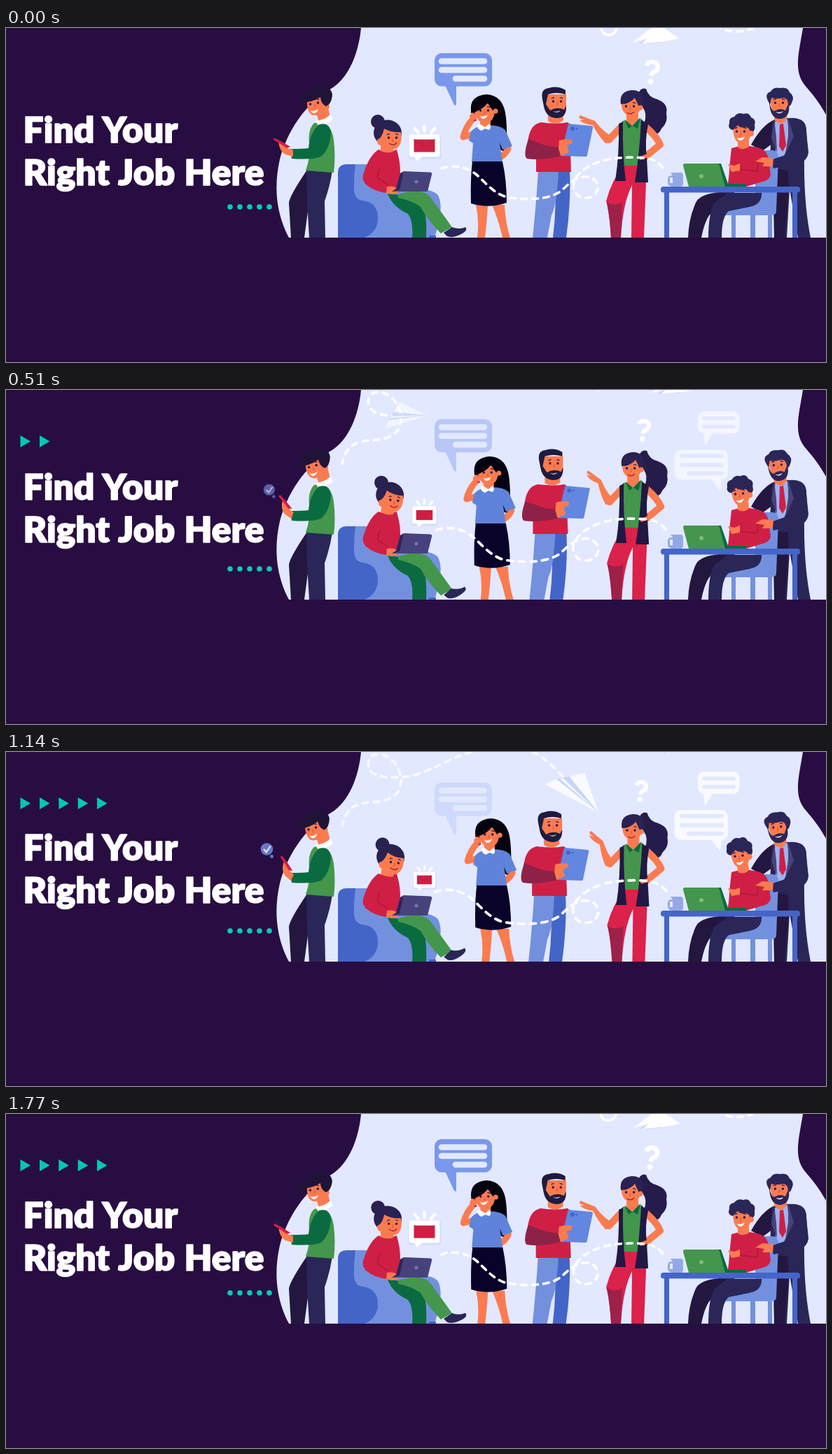
Recreate the animation shown at these times as an HTML page. Size 1171 px wide and 478 px high, loop 1800 ms.

```html
<!DOCTYPE html>
<html lang="en">
<head>
<meta charset="utf-8">
<title>Find Your Right Job Here</title>
<style>
  html, body { margin: 0; width: 100%; height: 100%; overflow: hidden; background: #280d42; }
  svg { display: block; width: 1171px; height: 478px; }
  .title { font: 900 51.5px Lato, Inter, sans-serif; word-spacing: 1.5px; fill: #fff; stroke: #fff; stroke-width: 1.6; stroke-linejoin: round; }
  .skin { fill: #fa7b50; }
  .limb { fill: none; stroke: #fa7b50; stroke-linecap: round; stroke-linejoin: round; }
  .red { fill: #d01f45; } .wine { fill: #8e2148; }
  .green { fill: #43964b; } .pine { fill: #0a6b40; }
  .navy { fill: #2b2658; } .dark { fill: #231740; }
  .blue { fill: #4465c8; } .mid { fill: #7390df; }
  .white { fill: #fff; } .sky { fill: #e2e8ff; } .teal { fill: #00c9b0; }
  .dash { fill: none; stroke: #fff; stroke-width: 3.6; stroke-linecap: round; stroke-dasharray: 8 8; }
</style>
</head>
<body>
<svg viewBox="0 0 1171 478">
  <defs>
    <clipPath id="stage"><rect width="1171" height="300"/></clipPath>
    <clipPath id="wipe"><rect id="wipeBox" x="18" y="60" height="28"/></clipPath>
    <mask id="reveal" maskUnits="userSpaceOnUse" x="460" y="-30" width="360" height="150">
      <path id="revealPath" fill="none" stroke="#fff" stroke-width="8"/>
    </mask>
    <g id="face">
      <circle cx="-5.5" r="1.7" fill="#2a1440"/><circle cx="5.5" r="1.7" fill="#2a1440"/>
      <path d="M-8-4q2-2 4-1M4-5q2-1 4 1" fill="none" stroke="#2a1440" stroke-width="1.2"/>
      <path d="M0 1q2 4-1 4" fill="none" stroke="#e2552f" stroke-width="1.2"/>
    </g>
    <path id="smile" class="white" d="M-5 0Q1 2 6-2Q4 4-1 4Q-4 3-5 0z"/>
  </defs>
  <rect width="1171" height="478" fill="#280d42"/>

  <g clip-path="url(#stage)">
    <path class="sky" d="M507 0C504 34 490 72 464 87C425 110 401 150 391 188C382 228 386 266 404 300H1171V124C1160 104 1150 93 1140 81C1124 60 1133 33 1138 0z"/>

    <!-- flying things -->
    <g id="trail"><g mask="url(#reveal)"><path id="route" class="dash" d="M480 107C484 80 500 73 521 72S563 66 564 42C564 20 548 3 531 3C516 3 513 22 524 30C535 37 548 37 562 36C600 36 640 2 672-1C705-8 745-6 760 4C778 16 787 27 798 38"/></g></g>
    <g id="plane">
      <path class="white" d="M11-20L53 0L2-5zM-11 20L53 0L-6 7z"/>
      <path d="M2-5L53 0L-6 7z" fill="#c3d0fa"/>
      <path class="white" d="M-1 1L53 0L-4 4z"/>
    </g>
    <g id="topPlane">
      <path class="white" d="M921-12L962 15L927 12zM894 21L924-2L934 10z"/>
      <path d="M903 22L930 8L936 21z" fill="#c3d0fa"/>
      <path class="white" d="M927 5L962 15L935 20L908 22z"/>
    </g>
    <circle id="ring" cx="861" cy="-1" r="11" fill="none" stroke="#fff" stroke-width="3.6"/>
    <path id="topDash" class="dash" d="M1014-4Q1040 14 1074-3"/>
    <g id="ask">
      <path d="M-8-8Q-7-14 0-14Q8-14 8-7Q8-2 3 0Q0 2 0 6" fill="none" stroke="#fff" stroke-width="6.5"/>
      <circle class="white" cy="14" r="4.2"/>
    </g>
    <g id="chat">
      <rect x="612" y="36" width="82" height="47.5" rx="10" fill="#7a98eb"/>
      <path d="M627 82L640 110Q643 112 643 109V82z" fill="#7a98eb"/>
      <path d="M622 47.5H683M622 60H683M642 72.5H683" stroke="#e2e8ff" stroke-width="8.5" stroke-linecap="round"/>
    </g>
    <g id="noteA">
      <rect class="white" x="988" y="24" width="59.5" height="32" rx="9"/>
      <path class="white" d="M996 54L998 74L1010 54z"/>
      <path d="M997 34H1039M997 46H1039" stroke="#e2e8ff" stroke-width="5.5" stroke-linecap="round"/>
    </g>
    <g id="noteB">
      <rect class="white" x="954.5" y="79.5" width="76.5" height="42.5" rx="9"/>
      <path class="white" d="M1006 120L1020 138L1022 120z"/>
      <path d="M965 88H1022M965 101H1022M975 113H1022" stroke="#e2e8ff" stroke-width="6" stroke-linecap="round"/>
    </g>

    <!-- man with phone -->
    <path class="dark" d="M430 203Q405 240 404 250L407 300H426L432 255L448 207z"/>
    <path class="navy" d="M429 204H466Q463 225 455 248L456 300H433L430 250z"/>
    <path class="green" d="M440 136Q464 131 468 160Q471 185 468 207L428 204Q435 185 433 165Q431 145 440 136z"/>
    <path class="skin" d="M442 118L460 114L463 128L447 135z"/>
    <path class="white" d="M442 133Q455 132 463 124L467 131Q458 138 446 140z"/>
    <path class="pine" d="M447 138Q462 134 464 150Q463 172 450 184Q438 189 408 187L406 173Q425 173 432 172Q434 150 447 138z"/>
    <g id="phoneHand">
      <path class="skin" d="M410 174Q400 174 393 162L389 162Q390 176 399 181L410 184z"/>
      <path class="red" d="M382 160Q382 157 385 158L396 164L406 170L401 172L392 166z"/>
    </g>
    <g id="head1">
      <circle class="skin" cx="457" cy="112" r="5"/>
      <path class="skin" d="M430 101Q430 90 446 92Q458 98 456 115Q449 126 439 125Q429 123 430 101z"/>
      <path d="M419 107Q419 96 431 92Q436 82 450 82Q466 85 466 97Q464 110 457 112Q450 109 449 99Q436 107 419 107z" fill="#201338"/>
      <use href="#face" transform="translate(440 108) rotate(-10)"/>
      <use href="#smile" x="440" y="118"/>
    </g>
    <g id="check">
      <circle r="10" fill="#6f89dc"/><circle cx="8" cy="12" r="2.8" fill="#6f89dc"/>
      <path d="M-5 0L-1 5L6-5" fill="none" stroke="#fff" stroke-width="2.6"/>
    </g>

    <!-- woman on armchair -->
    <path class="mid" d="M490 195H515Q540 200 544 235Q602 225 616 238Q627 255 612 300H480z"/>
    <path class="blue" d="M474 207Q474 195 487 195H499Q497 210 497 232Q498 246 510 247Q531 250 531 272Q531 292 512 300H474zM604 297H614V300H604z"/>
    <path class="pine" d="M545 237Q590 240 598 262Q601 275 600 300H580Q582 276 574 266Q552 256 545 237z"/>
    <path class="green" d="M560 238Q595 228 606 242Q622 264 637 285L621 294Q602 275 592 256Q580 247 560 243z"/>
    <path id="shoe" class="navy" d="M625 293L637 285Q648 289 656 285Q661 290 648 296Q637 301 630 298z"/>
    <path class="red" d="M532 174Q545 179 558 174L560 182Q566 205 560 236H544Q526 234 514 224Q507 216 511 207Q519 182 532 174z"/>
    <path d="M534 200Q530 210 531 215L546 225" fill="none" stroke="#a81a3c" stroke-width="1.5"/>
    <path class="skin" d="M544 227Q556 225 562 233Q556 241 543 236z"/>
    <path d="M568 205L606 206.500Q609 207 608 210L602 234H551L560 230z" fill="#47427c"/>
    <path d="M551 234L562 231L568 205L563 208L557 230z" fill="#2b2658"/>
    <circle cx="586" cy="220" r="2.5" fill="#7774a8"/>
    <g id="head2">
      <path class="skin" d="M535 165H553V177Q544 180 535 176z"/>
      <circle cx="531" cy="134" r="10" fill="#292150"/>
      <ellipse cx="545" cy="150" rx="20" ry="18.5" fill="#292150"/>
      <path class="skin" d="M530 160Q537 158 540 144Q550 150 564 149Q567 168 556 173Q542 177 535 168Q530 168 530 160z"/>
      <use href="#face" x="552" y="157"/>
      <path d="M547 165Q554 170 558 164" fill="none" stroke="#a7242f" stroke-width="1.5"/>
    </g>
    <g id="mail">
      <rect x="-23" y="-11" width="47" height="34" rx="4" fill="#d3ddf8"/>
      <path class="white" d="M-19-12H19Q22-12 22-9V17Q22 20 19 20H-3L-11 26L-14 20H-19Q-22 20-22 17V-9Q-22-12-19-12z"/>
      <path class="red" d="M-15-5H15V13H-15z"/>
      <path d="M-15-5L0 6L15-5" fill="none" stroke="#bd173b"/>
      <path d="M-14-21L-9-15M0-24V-17M15-21L10-15" stroke="#fff" stroke-width="4.5" stroke-linecap="round"/>
    </g>

    <!-- woman on the phone -->
    <g id="caller">
      <path d="M664 118Q662 97 686 95Q711 96 714 128Q717 160 712 177Q696 172 690 145z" fill="#05030f"/>
      <path class="skin" d="M671 253H688Q687 275 684 300H673Q676 275 671 253zM694 253H712Q713 278 720 300H709Q704 276 694 253z"/>
      <path class="limb" stroke-width="9" d="M667 130Q656 142 653 156L668 152M717 172Q713 184 694 190"/>
      <path d="M664 148Q672 139 688 139Q706 139 713 146L723 169L709 174L705 164L709 192H665L667 165L661 161z" fill="#5f83da"/>
      <path d="M666 191H709Q715 218 715 250Q690 259 664 251Q663 215 666 191z" fill="#090329"/>
      <path class="skin" d="M677 128H692V141Q684 146 677 140z"/>
      <path class="white" d="M673 139Q675 136 678 138L684 142L690 137Q694 142 690 146L684 144L679 147Q673 145 673 139z"/>
      <path class="skin" d="M668 110Q672 102 684 106L698 114Q699 134 684 137Q669 134 668 110z"/>
      <path d="M664 122Q662 98 686 96Q704 98 704 124Q694 120 688 107Q680 118 664 122z" fill="#05030f"/>
      <circle class="skin" cx="699" cy="119" r="3.5"/>
      <path class="red" d="M666 121L670 122L672 133L668 133z"/>
      <circle class="skin" cx="667" cy="127" r="5"/>
      <use href="#face" x="683" y="118"/><use href="#smile" x="682" y="126"/>
    </g>

    <!-- man with tablet -->
    <g id="reader">
      <path class="blue" d="M783 204H805Q807 250 800 300H781Q787 255 783 204z"/>
      <path class="mid" d="M760 204H789Q787 252 779 268L773 300H752Q757 255 760 204z"/>
      <path class="red" d="M764 135Q785 138 802 135Q813 141 812 165L806 175L807 206H757V170L745 165Q747 138 764 135z"/>
      <path class="wine" d="M746 159Q738 182 744 187Q765 190 795 183L792 171Q772 170 760 164z"/>
      <path d="M803 137L836 140Q839 140 838 143L830 182Q830 184 827 184L792 183z" fill="#6387e0"/>
      <circle cx="809" cy="144" r="3" fill="#4465c8"/><circle cx="815" cy="144" r="1.5" fill="#4465c8"/>
      <path class="skin" d="M790 161Q800 158 809 160L808 165L801 168L804 178L792 183L789 172z"/>
      <path class="skin" d="M774 118H796V132Q785 141 774 133z"/>
      <path class="skin" d="M767 95H800V114Q796 127 786 127Q772 124 767 95z"/>
      <path d="M766 102Q763 87 775 86Q788 82 799 89L799 95Q786 91 774 95L771 109L777 118Q787 112 797 117L800 111Q801 129 786 129Q771 128 768 112z" fill="#1f1b40"/>
      <use href="#face" x="787" y="105"/>
      <path class="white" d="M781 119Q787 121 792 118Q788 123 781 119z"/>
    </g>

    <!-- woman asking -->
    <g id="asker">
      <path d="M902 97Q905 84 914 87Q917 99 930 102Q946 108 943 122Q946 135 936 144Q932 155 920 152Q908 146 913 130Q915 118 906 110z" fill="#251c4c"/>
      <path d="M882 196H915L911 300H893L894 225Q881 250 878 300H864Q862 265 857 248Q864 220 882 196z" fill="#dc214a"/>
      <path class="wine" d="M858 249Q870 256 880 249L878 300H864Q862 270 858 249z" opacity=".8"/>
      <path class="limb" stroke-width="10" d="M914 142Q930 156 934 167L912 185M877 143L861 160"/>
      <g id="askArm">
        <path class="skin" d="M866 155Q854 150 841 133L820 125Q817 127 820 130L826 131L819 132Q826 138 838 139Q845 153 856 165Q864 166 866 155z"/>
      </g>
      <path class="green" d="M880 133L908 130L911 160L904 197H882L879 160z"/>
      <path d="M875 137L881 134Q880 180 885 219H870Q876 180 875 137zM907 131L917 138Q912 160 915 185L917 221H898Q905 178 907 131z" fill="#211844"/>
      <path class="limb" stroke-width="5" d="M915 183L907 186"/>
      <path class="skin" d="M886 120H903V131L894 140L886 133z"/>
      <path class="pine" d="M883 131L894 140L889 144zM906 128L895 140L902 144z"/>
      <ellipse class="skin" cx="893" cy="110" rx="14" ry="16"/>
      <path d="M878 109Q875 91 893 89Q911 88 910 108L906 118Q902 108 898 100Q890 109 878 109z" fill="#292353"/>
      <circle class="skin" cx="906" cy="114" r="3.5"/>
      <use href="#face" x="891" y="112"/>
      <path d="M887 121Q892 125 897 120" fill="none" stroke="#a7242f" stroke-width="1.5"/>
    </g>

    <!-- desk group -->
    <path class="navy" d="M1095 185H1140Q1139 250 1149 300H1131L1119 230L1115 300H1097z"/>
    <path class="dark" d="M1098 131Q1080 138 1064 167L1080 176L1102 160zM1096 185H1116L1118 232L1112 300H1097z"/>
    <path class="navy" d="M1094 133Q1106 128 1118 129Q1143 127 1143 147L1145 181Q1143 190 1134 193L1136 207L1090 200z"/>
    <path fill="#9db3f2" d="M1098 134L1116 130L1119 165L1108 190L1099 180z"/>
    <path class="red" d="M1105 138L1110 137L1114 168L1109 177L1104 169z"/>
    <path fill="#454478" d="M1097 133L1093 156L1101 178L1100 155zM1117 129L1125 155L1113 180L1117 155z"/>
    <g id="head4">
      <path class="skin" d="M1097 118H1115V131L1107 138L1097 132z"/>
      <path class="skin" d="M1091 98H1118V116Q1113 128 1104 128Q1092 124 1091 98z"/>
      <path class="navy" d="M1090 106Q1094 122 1099 118Q1106 114 1113 118L1118 107Q1121 130 1104 130Q1091 129 1090 106z"/>
      <path class="navy" d="M1088 104Q1083 94 1092 91Q1096 84 1106 86Q1116 84 1119 92Q1127 98 1122 107Q1120 113 1117 111Q1117 100 1110 100Q1101 102 1093 100L1091 110z"/>
      <use href="#face" x="1104" y="107"/>
      <path class="white" d="M1099 120Q1105 122 1110 119Q1106 125 1099 120z"/>
    </g>
    <path class="mid" d="M1070 175H1095Q1103 176 1103 185L1100 262Q1100 268 1092 268H1004Q1000 258 1012 248L1070 240zM1036 266h6v34h-6zM1063 266h7v34h-7zM1088 266h6v34h-6z"/>
    <path class="dark" d="M1040 234Q992 234 985 250Q975 272 974 300H993Q998 274 1008 263L1045 252z"/>
    <path class="navy" d="M1030 236H1079Q1080 252 1062 256L1032 262Q1022 270 1022 300H1003Q1003 265 1012 250z"/>
    <path class="red" d="M1036 172Q1052 166 1068 170Q1086 172 1089 187L1092 210Q1090 218 1080 220L1057 227H1030Q1033 212 1033 200z"/>
    <path d="M1074 190L1073 205L1045 202" fill="none" stroke="#a81a3c" stroke-width="1.5"/>
    <path class="skin" d="M1031 195L1040 197L1048 194V204L1036 206z"/>
    <g id="head3">
      <path class="skin" d="M1045 160H1061V170Q1053 176 1045 171z"/>
      <path class="skin" d="M1038 140Q1052 132 1064 142Q1066 160 1054 165Q1038 168 1038 140z"/>
      <path class="navy" d="M1038 146Q1030 144 1033 136Q1032 128 1040 127Q1045 120 1053 123Q1061 120 1064 128Q1072 131 1069 139Q1071 147 1063 152Q1063 143 1057 142Q1049 144 1045 139z"/>
      <circle class="skin" cx="1064" cy="151" r="4"/>
      <use href="#face" x="1049" y="148"/><use href="#smile" x="1049" y="157"/>
    </g>
    <path class="navy" d="M1129 132Q1143 132 1143 150L1146 178Q1145 188 1134 193L1096 201L1092 189L1127 177z"/>
    <path class="skin" d="M1096 186L1080 185L1070 191L1083 193L1080 198L1095 198z"/>
    <path d="M949 207h14q4 0 4 4v12q0 4-4 4h-10q-8 0-8-6v-5q0-5 7-5" fill="#94a9e4"/>
    <path d="M952 214h-4v8h4z" class="sky"/>
    <path class="blue" d="M940 230h7v70h-7zM1123 230h7v70h-7z"/>
    <rect class="blue" x="935" y="227" width="199" height="8.5" rx="4"/>
    <path class="pine" d="M1016 194H1021L1031 223H1055Q1058 224 1057 227H1024z"/>
    <path class="green" d="M969 194H1016Q1018 194 1019 197L1027 227H975L967 197Q967 194 969 194z"/>
    <circle cx="993" cy="212" r="3" fill="#7fbd72"/>

    <path id="swirl" class="dash" d="M622 201C640 194 660 200 672 210C685 221 695 236 715 242C745 247 775 245 790 235C800 228 806 217 824 213C840 211 846 222 845 230C843 240 834 244 826 243C812 242 808 228 812 218C820 203 835 195 855 189C880 184 905 184 922 188Q932 192 938 200"/>
  </g>

  <g id="title" class="title"><text x="24.5" y="163.5">Find Your</text><text x="24.5" y="224.5">Right Job Here</text></g>
  <path class="teal" clip-path="url(#wipe)" d="M20.500 65v17l14.500-8.500zM48 65v17l14.500-8.500zM75.300 65v17l14.500-8.500zM102.700 65v17l14.500-8.500zM130 65v17l14.500-8.500z"/>
  <path d="M320 256H377" stroke="#0ccbb3" stroke-width="7.6" stroke-linecap="round" stroke-dasharray="0 14"/>
</svg>
<script>
  const LOOP = 1800, STEP = 30;
  const $ = id => document.getElementById(id);
  const route = $('route'), reveal = $('revealPath');
  const total = route.getTotalLength();
  reveal.setAttribute('d', route.getAttribute('d'));

  const put = (id, transform) => $(id).setAttribute('transform', transform);
  const move = (id, x, y) => put(id, `translate(${x} ${y})`);
  const turn = (id, deg, x, y) => put(id, `rotate(${deg} ${x} ${y})`);
  const fade = (id, a) => $(id).setAttribute('opacity', a);
  const smooth = p => p * p * (3 - 2 * p);

  function flight(t, p) {
    const u = Math.min(t / 900, 1);
    const s = total * u * (0.62 + 0.38 * u);
    const at = route.getPointAtLength(s);
    const a = route.getPointAtLength(Math.max(0, s - 4));
    const b = route.getPointAtLength(Math.min(total, s + 4));
    const deg = Math.atan2(b.y - a.y, b.x - a.x) * 180 / Math.PI;
    put('plane', `translate(${at.x} ${at.y}) rotate(${deg}) scale(${0.5 + 0.8 * u})`);
    fade('plane', smooth(p));
    fade('trail', t > 900 ? smooth(p) : 1);
    reveal.setAttribute('stroke-dasharray', `${s} ${total + 10}`);
  }

  function draw(t) {
    const p = 1 - Math.abs(t / 900 - 1);
    const e = smooth(p);

    move('title', 0, -11 * p);
    $('wipeBox').setAttribute('width', Math.max(0, 7 + 0.179 * (t - 240)));
    flight(t, p);

    move('topPlane', 48 * p, -29 * p);
    move('ring', -29 * p, -19 * p);
    move('topDash', 15 * p, -24 * p);
    put('ask', `translate(${922 - 21 * p} ${62.5 - 9.5 * p}) rotate(6) scale(${1 - 0.15 * p})`);
    put('swirl', `translate(827 215) scale(${1 + 0.063 * p}) translate(-827 -215)`);

    move('chat', 0, 9.5 * e);
    fade('chat', 1 - e);
    move('noteA', 0, 15 * (1 - p));
    move('noteB', 0, 14.5 * (1 - p));
    fade('noteA', e);
    fade('noteB', e);
    put('check', `translate(${387.5 - 20.5 * p} ${155.5 - 22.5 * p}) scale(${0.55 + 0.45 * p})`);
    fade('check', Math.min(1, 1.2 * p));
    put('mail', `translate(597.5 ${164.5 + 19 * e}) scale(${1 - 0.36 * e})`);

    turn('head1', -9 * p, 452, 132);
    turn('phoneHand', 35 * p, 408, 177);
    turn('head2', 11.5 * p, 545, 178);
    turn('shoe', -13 * p, 628, 292);
    turn('head3', -9 * p, 1054, 170);
    turn('head4', -8 * p, 1107, 134);
    move('caller', 8.5 * p, 0);
    move('reader', -8 * p, 0);
    move('asker', 2 * p, 0);
    turn('askArm', 27 * p, 861, 160);
  }

  const start = performance.now();
  function tick() {
    const t = (performance.now() - start) % LOOP;
    draw(Math.floor(t / STEP) * STEP);
    requestAnimationFrame(tick);
  }
  tick();
</script>
</body>
</html>
```
